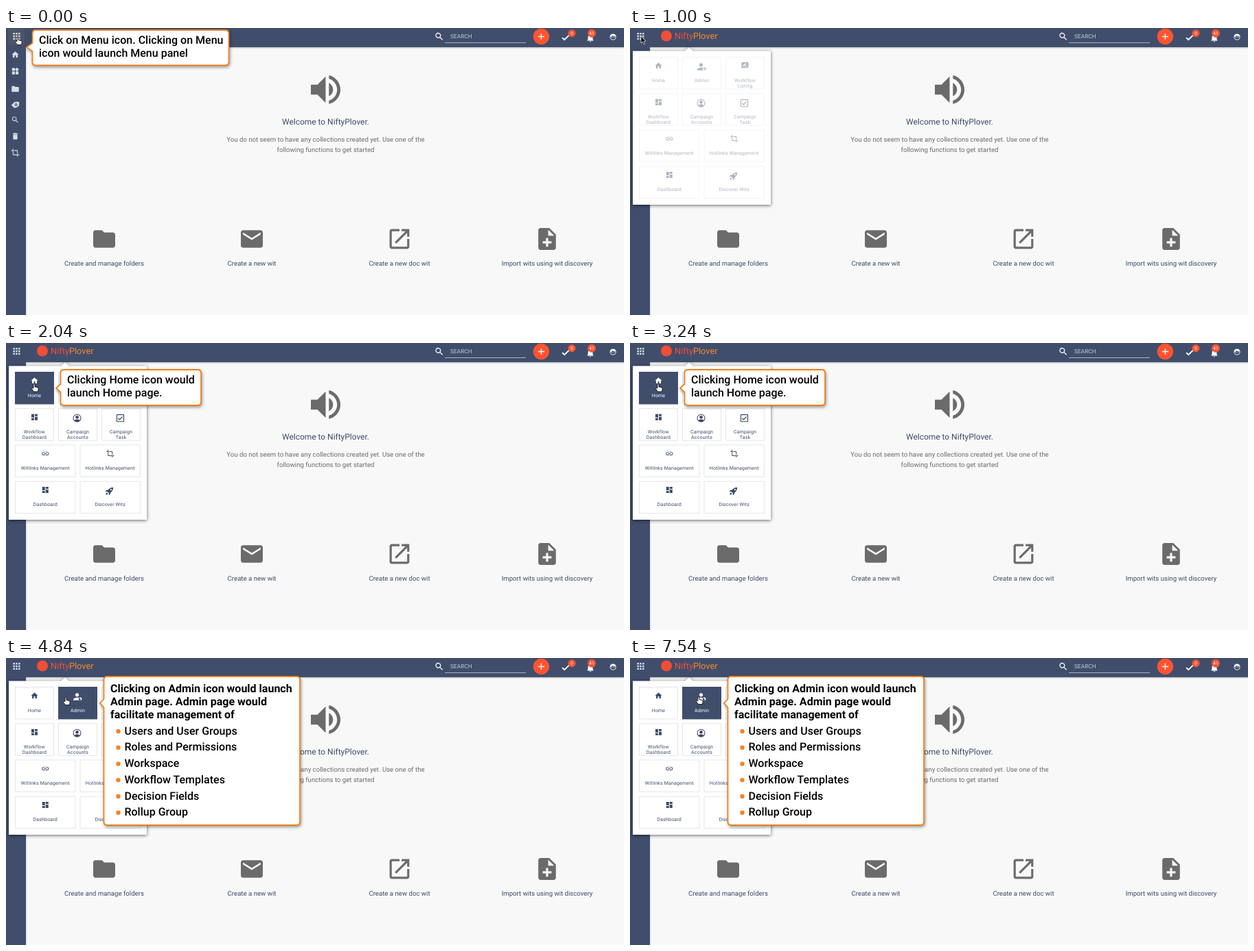
An HTML page for the animation above (8 s loop, 900 px wide and 419 px high).

```html
<!DOCTYPE html>
<html lang="en">
<head>
<meta charset="utf-8">
<title>Menu panel tour</title>
<style>
  html, body { margin: 0; width: 100%; height: 100%; overflow: hidden; background: #f8f8f8; }
  svg { display: block; width: 100%; height: 100%; }
  text { font-family: Roboto, sans-serif; text-rendering: geometricPrecision; }
  .tile { fill: #3d4b69; color: #3d4b69; }
  .tile rect { fill: #fff; stroke: #e6e6e8; }
  .tile.hover { fill: #fff; color: #fff; }
  .tile.hover rect { fill: #404e6c; stroke: #404e6c; }
  .callout path { fill: #fff; stroke: #f0801f; stroke-width: 1.8; filter: drop-shadow(1px 2px 2px #0006); }
</style>
</head>
<body>
<svg id="stage" viewBox="0 0 900 419"></svg>
<script>
const NAVY = '#404e6c', INK = '#3d4b69', GREY = '#6b6b6b', ORANGE = '#ff5432';
const PERSON = 'M12 12c2.21 0 4-1.79 4-4s-1.79-4-4-4-4 1.79-4 4 1.79 4 4 4zm0 2c-2.67 0-8 1.34-8 4v2h16v-2c0-2.66-5.33-4-8-4z';

// Icon outlines on a 24-unit grid
const ICONS = {
  home: 'M10 20v-6h4v6h5v-8h3L12 3 2 12h3v8z',
  widgets: 'M13 13v8h8v-8zM3 21h8v-8H3zM3 3v8h8V3zM16.7 1.7L11 7.3l5.7 5.7 5.6-5.7z',
  folder: 'M10 4H4c-1.1 0-2 .9-2 2v12c0 1.1.9 2 2 2h16c1.1 0 2-.9 2-2V8c0-1.1-.9-2-2-2h-8z',
  tag: 'M1 13L8 6Q10 4 13 4H21Q23 4 23 6V11Q23 14 21 16L15 20Q11 22 7 19ZM14 8a4 4 0 1 0 .1 0zM14 10.500a1.500 1.500 0 1 1-.1 0z',
  search: 'M15.5 14h-.8l-.3-.3A6.5 6.500 0 1 0 13.700 14.400l.3.3v.8l5 5 1.500-1.500zM9.500 14a4.500 4.500 0 1 1 .01 0z',
  bin: 'M6 19c0 1.1.9 2 2 2h8c1.1 0 2-.9 2-2V7H6zM19 4h-3.500l-1-1h-5l-1 1H5v2h14z',
  crop: 'M17 15h2V7c0-1.1-.9-2-2-2H9v2h8zM7 17V1H5v4H1v2h4v10c0 1.1.9 2 2 2h10v4h2v-4h4v-2z',
  speaker: 'M3 9v6h4l5 5V4L7 9zm13.500 3c0-1.770-1.020-3.290-2.500-4.030v8.050c1.480-.730 2.500-2.250 2.500-4.020zM14 3.230v2.060c2.890.860 5 3.540 5 6.710s-2.110 5.850-5 6.710v2.060c4.010-.910 7-4.490 7-8.770s-2.990-7.860-7-8.770z',
  mail: 'M20 4H4c-1.100 0-2 .9-2 2v12c0 1.100.9 2 2 2h16c1.100 0 2-.9 2-2V6c0-1.100-.9-2-2-2zm0 4l-8 5-8-5V6l8 5 8-5z',
  open: 'M19 19H5V5h7V3H5c-1.100 0-2 .9-2 2v14c0 1.100.9 2 2 2h14c1.100 0 2-.9 2-2v-7h-2zM14 3v2h3.600l-9.840 9.830 1.410 1.410L19 6.400V10h2V3z',
  addNote: 'M14 2H6c-1.100 0-2 .9-2 2v16c0 1.100.9 2 2 2h12c1.100 0 2-.9 2-2V8zm2 14h-3v3h-2v-3H8v-2h3v-3h2v3h3zm-3-7V3.500L18.500 9z',
  check: 'M9 15.200L4.800 11l-2.200 2.200L9 19.600 22 6.800l-2.200-2.200z',
  bell: 'M12 22c1.100 0 2-.9 2-2h-4c0 1.100.9 2 2 2zm6-6v-5c0-3.070-1.640-5.640-4.500-6.320V4a1.500 1.500 0 0 0-3 0v.680C7.630 5.360 6 7.920 6 11v5l-2 2v1h16v-1z',
  face: 'M12 2a10 10 0 1 0 .01 0zM12 20a8 8 0 0 1-8-8q5-1 6.500-4.500Q14 11 20 10.500V12a8 8 0 0 1-8 8zM9 11.700a1.300 1.300 0 1 0 .01 0zM15 11.700a1.300 1.300 0 1 0 .01 0z',
  admin: PERSON + 'M19 13.500a3.500 3.500 0 1 0 .01 0z',
  review: 'M20 2H4c-1.100 0-2 .9-2 2v18l4-4h14c1.100 0 2-.9 2-2V4c0-1.100-.9-2-2-2zM6 14v-2.500l7.200-7.200 2.500 2.500L8.500 14zm12 0h-7.500l2-2H18z',
  dashboard: 'M3 13h8V3H3zm0 8h8v-6H3zm10 0h8V11h-8zm0-18v6h8V3z',
  account: 'M12 1a11 11 0 1 0 .01 0zM12 2.800a9.200 9.200 0 0 1 7 15.200Q17 15 12 15T5 18A9.200 9.200 0 0 1 12 2.800zM12 5a4.300 4.300 0 1 0 .01 0z',
  task: 'M4 2Q2 2 2 4V20Q2 22 4 22H20Q22 22 22 20V4Q22 2 20 2ZM4 4H20V20H4ZM10 14.300L7 11.300 5.500 12.800 10 17.300 18.500 8.800 17 7.300Z',
  link: 'M3.900 12c0-1.710 1.390-3.100 3.100-3.100h4V7H7a5 5 0 0 0 0 10h4v-1.900H7c-1.710 0-3.100-1.390-3.100-3.100zM8 13h8v-2H8zm9-6h-4v1.900h4a3.100 3.100 0 0 1 0 6.200h-4V17h4a5 5 0 0 0 0-10z',
  rocket: 'M22 2Q13 2 8 9L3 10 1 14 6 13.500 10.500 18 10 23 14 21 15 16Q22 11 22 2ZM16 6a2 2 0 1 1-.01 0zM5 16Q2 17 2 22 7 22 8 19Z',
};

const icon = (name, x, y, size, fill = 'inherit') =>
  `<path d="${ICONS[name]}" fill="${fill}" fill-rule="evenodd" transform="translate(${x - size / 2} ${y - size / 2}) scale(${size / 24})"/>`;
const text = (str, x, y, size, attrs = '') =>
  `<text x="${x}" y="${y}" font-size="${size}" ${attrs}>${str}</text>`;
const mid = 'text-anchor="middle"';

function header() {
  let dots = '';
  for (let i = 0; i < 9; i++)
    dots += `<rect x="${10.4 + i % 3 * 3.8}" y="${7 + Math.floor(i / 3) * 3.8}" width="2.5" height="2.5"/>`;
  const badge = (x, r, label) =>
    `<circle cx="${x}" cy="7.700" r="${r}" fill="${ORANGE}"/>` + text(label, x, 10, 6.5, mid + ' fill="#fff"');
  return `<path d="M0 0H900V28H29V419H0Z" fill="${NAVY}" style="filter:drop-shadow(0 1px 1px #0004)"/>
    <rect id="menuHover" x="3" y="1" width="24" height="24" rx="2" fill="#555b68" opacity=".6"/>
    <g fill="#d5d9e2">${dots}</g>
    <circle cx="53" cy="11.500" r="8" fill="#f04e37"/>
    ${text('<tspan fill="#f04e37">Nifty</tspan><tspan fill="#f58a2c">Plover</tspan>', 65, 16, 12.8)}
    ${icon('search', 631, 12.5, 15, '#fff')}
    ${text('SEARCH', 647, 14.5, 8.4, 'fill="#c3c8d3"')}
    <path d="M639 21.500H757" stroke="#aab1c0"/>
    <circle cx="779.500" cy="12.500" r="11.700" fill="${ORANGE}"/>
    <path d="M775 12.500h9M779.500 8v9" stroke="#fff" stroke-width="1.300"/>
    ${icon('check', 815, 14, 14, '#fff')}${badge(824, 5.5, '0')}
    ${icon('bell', 851, 14.5, 14, '#fff')}${badge(853, 6, '41')}
    ${icon('face', 884, 13, 11, '#fff')}`;
}

function sidebar() {
  const items = [['home', 39], ['widgets', 63], ['folder', 89], ['tag', 112], ['search', 134], ['bin', 158], ['crop', 182]];
  return items.map(([name, y]) => icon(name, 13.5, y, 12.5, '#d9dde5')).join('');
}

function page() {
  const actions = [
    ['folder', 143, 'Create and manage folders'], ['mail', 358, 'Create a new wit'],
    ['open', 573, 'Create a new doc wit'], ['addNote', 788, 'Import wits using wit discovery']];
  return icon('speaker', 465.5, 90, 57.4, GREY)
    + text('Welcome to NiftyPlover.', 465.5, 141, 11.95, `${mid} fill="${INK}"`)
    + text('You do not seem to have any collections created yet. Use one of the', 465.5, 166.2, 9.65, `${mid} fill="${GREY}"`)
    + text('following functions to get started', 465.5, 180.8, 9.65, `${mid} fill="${GREY}"`)
    + actions.map(([name, x, label]) => icon(name, x, 308, 38.4, GREY)
      + text(label, x, 346.8, 9.65, `${mid} fill="${INK}"`)).join('');
}

function panel() {
  const tile = (col, row, wide, name, size, lines, id = '') => {
    const x = 13.5 + col * (wide ? 94.5 : 63), y = 42.5 + row * 53.2, width = wide ? 87.5 : 56;
    const cx = x + width / 2;
    return `<g class="tile" id="${id}"><rect x="${x}" y="${y}" width="${width}" height="46.500"/>`
      + icon(name, cx - (size > 12 ? 1 : 0), y + 12.5 + (size > 12 ? 1.5 : 0), size)
      + lines.split('|').map((line, i) =>
        text(line, cx, y + 36 + i * 8.6, 7, mid + ' letter-spacing=".17"')).join('') + '</g>';
  };
  return `<path d="M4 33.500H80L86 28.500 92 33.500H205V258H4Z" fill="#fff" style="filter:drop-shadow(0 1px 2.500px #0009)"/>
    <g id="tiles">${[
      tile(0, 0, false, 'home', 12, 'Home', 'homeTile'),
      tile(1, 0, false, 'admin', 16, 'Admin', 'adminTile'),
      tile(2, 0, false, 'review', 12, 'Workflow|Listing'),
      tile(0, 1, false, 'dashboard', 12, 'Workflow|Dashboard'),
      tile(1, 1, false, 'account', 13, 'Campaign|Accounts'),
      tile(2, 1, false, 'task', 13.5, 'Campaign|Task'),
      tile(0, 2, true, 'link', 12, 'Witlinks Management'),
      tile(1, 2, true, 'crop', 12, 'Hotlinks Management'),
      tile(0, 3, true, 'dashboard', 12, 'Dashboard'),
      tile(1, 3, true, 'rocket', 13, 'Discover Wits'),
    ].join('')}</g>`;
}

function callout(id, left, top, right, bottom, tailX, tailY, lines, weight, extra = '') {
  const r = 5;
  const shape = `M${left + r} ${top}H${right - r}q${r} 0 ${r} ${r}V${bottom - r}q0 ${r} ${-r} ${r}H${left + r}
    q${-r} 0 ${-r} ${-r}V${tailY + 6}L${tailX} ${tailY}L${left} ${tailY - 6}V${top + r}q0 ${-r} ${r} ${-r}Z`;
  return `<g class="callout" id="${id}"><path d="${shape}"/>`
    + lines.map((line, i) => text(line, left + 9.5, top + 20.3 + (weight > 500 ? 2.2 : 0) + i * 19, 16, `font-weight="${weight}"`)).join('')
    + extra + '</g>';
}

const topics = ['Users and User Groups', 'Roles and Permissions', 'Workspace', 'Workflow Templates', 'Decision Fields', 'Rollup Group']
  .map((topic, i) => `<circle cx="163.500" cy="${107 + i * 23.75}" r="3.200" fill="#f5822a"/>`
    + text(topic, 172.5, 111.5 + i * 23.75, 16, 'font-weight="500"')).join('');

document.getElementById('stage').innerHTML = `
  <rect width="900" height="419" fill="#f8f8f8"/>
  ${page()}${header()}${sidebar()}
  <g id="panel">${panel()}</g>
  ${callout('menuTip', 38.5, 3, 324.5, 54.5, 30, 28, ['Click on Menu icon. Clicking on Menu', 'icon would launch Menu panel'], 500)}
  ${callout('homeTip', 79.5, 39, 284, 91, 73, 66, ['Clicking Home icon would', 'launch Home page.'], 500)}
  ${callout('adminTip', 142.5, 27, 428, 244, 137, 66, ['Clicking on Admin icon would launch', 'Admin page. Admin page would', 'facilitate management of'], 700, topics)}
  <g id="cursor" stroke-linejoin="round">
    <path id="arrow" d="M0 0V10l2.300-2 1.600 3.600 1.800-.8-1.600-3.500H7z" fill="#000" stroke="#fff" stroke-width=".7"/>
    <path id="hand" d="M-1 6V.5a1 1 0 0 1 2 0V4l4 1q1.400.4 1.200 2L5.500 11H-.5L-3.500 7q-.5-1.400 1-1.200z" fill="#fff" stroke="#111" stroke-width=".9"/>
  </g>`;

const $ = id => document.getElementById(id);
const show = (id, on) => { $(id).style.display = on ? '' : 'none'; };

function cursorAt(t) {
  if (t < 1000) return [17, 13.5];
  if (t < 1240) {
    const k = Math.floor((t - 1000) / 20) / 12;
    return [16 + 25 * k, 12 + 48 * k - 3 * k * (1 - k)];
  }
  if (t < 4640) return [41, 60];
  if (t < 4840) return [43, 60.5];
  return t < 5040 ? [87, 57.5] : [100, 56.5];
}

function draw(t) {
  const [x, y] = cursorAt(t);
  const opened = t >= 1000, onAdmin = t >= 4840;
  const onHome = opened && !onAdmin && y > 42;
  show('panel', opened);
  show('menuHover', !opened);
  show('menuTip', !opened);
  show('homeTip', t >= 1240 && !onAdmin);
  show('adminTip', onAdmin);
  $('tiles').setAttribute('opacity', Math.min(1, 0.4 + Math.floor((t - 1000) / 20) * 0.06));
  $('homeTile').classList.toggle('hover', onHome);
  $('adminTile').classList.toggle('hover', onAdmin);
  const pointing = !opened || onHome || onAdmin;
  show('hand', pointing);
  show('arrow', !pointing);
  $('cursor').setAttribute('transform', `translate(${x} ${y})`);
}

function tick() {
  draw(performance.now() % 8000);
  requestAnimationFrame(tick);
}
tick();
</script>
</body>
</html>
```
